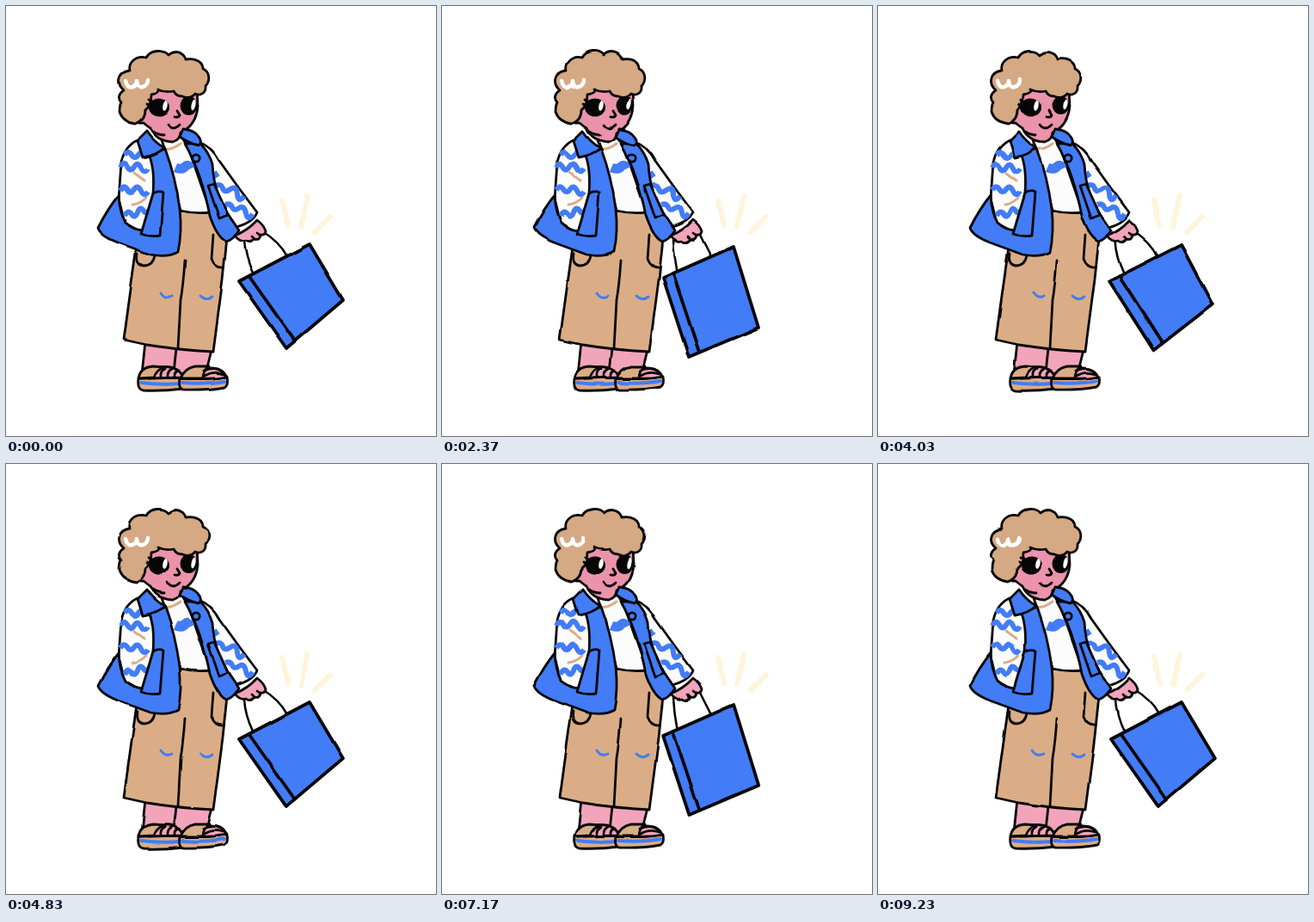
An HTML page that plays this animation: 500x500 px, repeating every 9.33 s.

```html
<!DOCTYPE html>
<html lang="en">
<head>
<meta charset="utf-8">
<title>Swinging bag</title>
<style>
html, body { margin: 0; width: 100%; height: 100%; overflow: hidden; background: #fff; }
svg { display: block; width: 100vw; height: 100vh; }
path, ellipse, circle { stroke: #050505; stroke-width: 2.8; stroke-linecap: round; stroke-linejoin: round; fill: none; }
.blue { fill: #427cf7; }
.tan { fill: #dbad86; }
.hair { fill: #d4a983; }
.face { fill: #eb93ab; }
.skin { fill: #f2a4bb; }
.white { fill: #fcfcfc; }
.ink { fill: #050505; }
.wave { stroke: #427cf7; stroke-width: 6; stroke-linecap: butt; }
.thin { stroke: #427cf7; stroke-width: 3; }
.sole { stroke: #427cf7; stroke-width: 4; }
.fold { stroke: #dbad86; stroke-width: 3; }
.shine { stroke: #fff; stroke-width: 4.5; }
.none { stroke: none; }
#bag path { stroke-width: 3.8; }
#bag .string { stroke-width: 2.6; }
#sparks path { stroke: #fff4dc; stroke-width: 6; }
</style>
</head>
<body>
<svg viewBox="0 0 500 500">
  <filter id="boil" filterUnits="userSpaceOnUse" x="0" y="0" width="500" height="500" color-interpolation-filters="sRGB">
    <feTurbulence id="noise" type="fractalNoise" baseFrequency=".03" numOctaves="1"/>
    <feDisplacementMap in="SourceGraphic" scale="3" xChannelSelector="R" yChannelSelector="G"/>
  </filter>
  <g filter="url(#boil)">
    <!-- legs and sandals -->
    <path class="skin" d="M162 390L158 428H232L239 400Z"/>
    <path d="M198 398L195 426"/>
    <path class="tan" d="M154 433Q152 446 160 447Q182 448 206 445V432Z"/>
    <path class="skin" d="M165 433Q168 421 178 420Q200 417 206 432Z"/>
    <path class="tan" d="M154 433Q156 420 171 419L184 420Q175 423 172 432Z"/>
    <path d="M180 432Q179 424 185 422M188 432Q187 425 193 422M196 432Q195 425 201 424"/>
    <path class="sole" d="M157 438Q180 441 203 439"/>
    <path class="tan" d="M202 433Q200 445 206 446Q232 447 254 443Q259 440 257 431Q230 435 202 433Z"/>
    <path class="skin" d="M224 433Q228 422 238 421Q252 421 256 431Q242 434 224 433Z"/>
    <path class="tan" d="M203 433Q208 421 220 419L236 419Q229 424 229 433Z"/>
    <path d="M230 424Q242 419 250 424M231 430Q241 424 253 428"/>
    <path class="sole" d="M205 438Q232 440 254 436"/>

    <!-- trousers -->
    <path class="tan" d="M152 280L146 322L137 388Q150 391 164 394Q200 400 241 402L252 318L257 270L238 238H200Z"/>
    <path d="M208 296Q206 325 203 342L200 398M153 288Q151 301 160 302Q171 302 173 290M241 266L239 294Q243 305 253 304"/>
    <path class="thin" d="M180 333Q185 341 193 337M226 337Q233 344 240 338"/>

    <!-- shirt -->
    <path class="white" d="M181 156L203 150L212 165L238 240Q220 242 203 238L186 170Z"/>
    <path class="fold" d="M183 167Q194 167 203 160"/>
    <path class="wave" style="stroke-width:11" d="M197 188Q204 191 208 187T215 189"/>

    <!-- right sleeve and vest -->
    <path class="white" d="M224 158Q240 164 248 180L271 212L292 240Q288 251 268 257L240 215L228 178Z"/>
    <path class="wave" d="M242 193l4 6M244 209q6-3 8 3t9 1t8 6t8 2M255 231q6-2 8 3t8 1t8 6t8 1"/>
    <path class="blue" d="M208 160L226 160Q236 170 240 184Q241 204 247 219L258 242L271 261Q264 272 256 274Q245 268 237 244Q228 196 208 160Z"/>
    <path class="blue" d="M235 209L242 207L258 243L248 247Z"/>
    <circle class="blue" cx="221" cy="177" r="4.2"/>

    <!-- left sleeve and vest -->
    <path class="white" d="M153 156Q138 163 134 182L131 224L138 252L162 266L172 218L172 174Z"/>
    <path class="wave" d="M138 173q4-6 8 0t8 0t6 2M133 188q4-8 8-1t8 0t8 1t8 1M133 214q4-7 8-1t8 0t8 2t8 1M138 244q4-8 8-2t7-2t7-2t7-2"/>
    <path class="fold" d="M149 194L161 203M147 231Q156 230 163 223"/>
    <path class="blue" d="M167 174L185 166Q197 198 202 236Q205 262 200 286Q188 293 168 289L130 275Q110 267 107 258Q118 236 131 220Q132 240 139 252Q147 260 160 261L171 218Q173 190 167 174Z"/>
    <path class="blue" d="M171 218Q178 214 183 217L179 267Q167 269 157 265Z"/>

    <!-- head -->
    <path class="face" d="M163 120L150 124Q148 137 160 136Q166 141 168 142Q174 157 194 158Q203 155 203 147Q221 139 223 117L222 98L172 92Z"/>
    <path d="M171 146Q177 150 184 150"/>
    <path class="blue" d="M164 146L153 157L159 176Q174 174 184 165Q172 158 164 146Z"/>
    <path class="blue" d="M202 152L206 143Q219 144 224 152Q229 158 224 162Q213 160 202 152Z"/>
    <path class="hair" d="M151 137Q136 135 132 123Q132 116 134 112C129 107 132 101 137 98C128 90 130 77 144 75C142 66 151 57 163 60C168 51 182 50 188 57C195 51 206 53 209 62C220 60 229 65 229 73C238 77 237 88 232 93C233 101 226 105 220 102Q214 109 205 105Q198 105 195 99Q185 101 177 97Q180 101 169 103Q169 116 162 121Q162 133 151 137Z"/>
    <path class="shine" d="M139 87Q141 96 147 94Q152 92 152 87Q153 96 159 94Q165 92 165 86"/>
    <ellipse class="ink none" cx="178" cy="118" rx="12" ry="10.5"/>
    <ellipse class="ink none" cx="212.5" cy="116" rx="10" ry="11"/>
    <ellipse class="white none" cx="185" cy="116" rx="2.6" ry="6" transform="rotate(12 185 116)"/>
    <ellipse class="white none" cx="218" cy="115" rx="2.4" ry="6.5" transform="rotate(12 218 115)"/>
    <path d="M164 114L169 117M166 109L172 112"/>
    <path d="M199 122L202 127Q201 130 196 129M188 138Q194 146 202 138"/>

    <!-- bag -->
    <g id="bag">
      <path class="string" id="strings"/>
      <path class="blue" id="body"/>
      <path id="crease"/>
    </g>
    <path class="skin" d="M266 267Q281 261 292 249Q300 255 302 262Q301 267 296 266Q295 273 289 271Q284 277 279 273Q272 275 266 267Z"/>
    <path d="M286 268L289 271M292 264L296 267"/>
    <g id="sparks">
      <path d="M321 225L328 255M351 221L343 257M377 245L359 263"/>
    </g>
  </g>
</svg>
<script>
const LOOP = 9330, STEP = 130, CYCLE = 36;
const $ = id => document.getElementById(id);

// each bag point: forward, middle and back position of the swing
const POINTS = {
  left:   [[271, 320], [265, 319], [257, 316]],
  top:    [[353, 277], [349, 279], [339, 280]],
  right:  [[392, 342], [382, 357], [368, 374]],
  bottom: [[326, 398], [309, 404], [287, 408]],
  grip:   [[277, 273], [273, 273], [269, 272]]
};

// parabola through the three positions
const at = ([a, m, b], f) => a.map((v, i) =>
  v * (1 - f) * (1 - 2 * f) + m[i] * 4 * f * (1 - f) + b[i] * f * (2 * f - 1));
const mix = (p, q, f) => p.map((v, i) => v + (q[i] - v) * f);

function draw(t) {
  let k = Math.floor((t % LOOP + 1) / STEP) % CYCLE;
  if (k === 5) k = 4; // one pose is held for two steps
  const f = (1 - Math.cos(2 * Math.PI * k / CYCLE)) / 2;
  const [left, top, right, bottom, grip] = Object.values(POINTS).map(p => at(p, f));
  const s1 = mix(left, top, .2), s2 = mix(left, top, .68);

  $('body').setAttribute('d', `M${left}L${top}L${right}L${bottom}Z`);
  $('crease').setAttribute('d', `M${mix(left, top, .14)}L${mix(bottom, right, .15)}`);
  $('strings').setAttribute('d',
    `M${grip}Q${grip[0] + 1},${grip[1] + 19} ${s1}M298,262Q${s2[0] - 9},274 ${s2}`);
  $('sparks').style.display = k > 5 && k < 15 ? 'none' : '';
  $('noise').setAttribute('seed', k + 1);
}

const start = performance.now();
function tick() {
  draw(performance.now() - start);
  requestAnimationFrame(tick);
}
tick();
</script>
</body>
</html>
```
